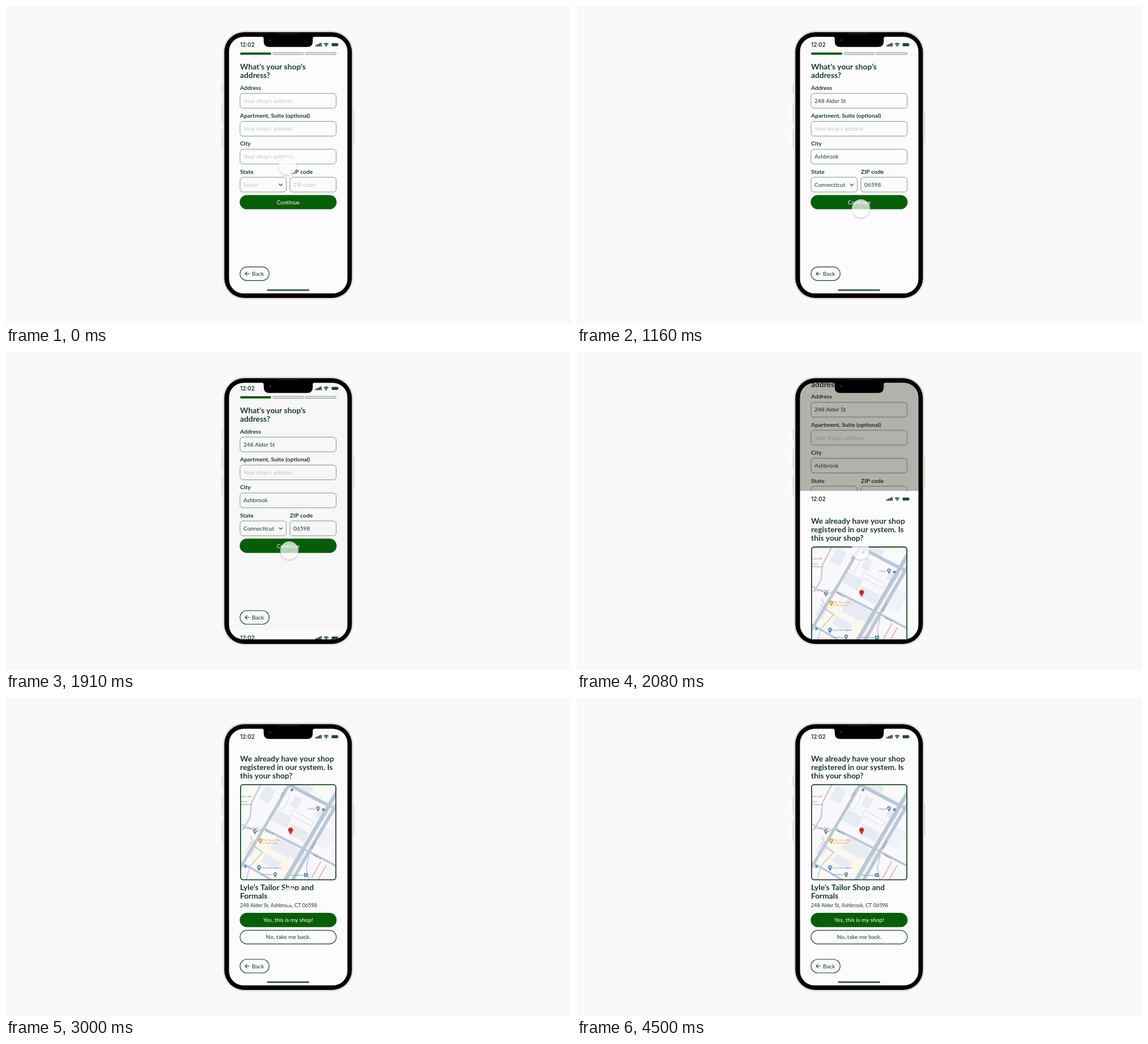
These frames come from a looping animation (997x561 px, 4.58 s). An HTML page with a canvas:

```html
<!DOCTYPE html>
<html lang="en">
<head>
<meta charset="utf-8">
<title>Shop address sign-up</title>
<style>
  html, body { margin: 0; width: 100%; height: 100%; overflow: hidden; background: #f9f9fc; }
  canvas { display: block; width: 997px; height: 561px; }
</style>
</head>
<body>
<canvas id="stage"></canvas>
<script>
const W = 997, H = 561, LOOP = 4580, FPS = 12;
const INK = '#1d3c2a', GREEN = '#075f08', PAPER = '#fcfcfe', HINT = '#c4c6cc', EDGE = '#87938f';
const SCREEN = { x: 393.5, y: 54.5, w: 209, h: 452.5, r: 26 };
const STREET = '248 Alder St', CITY = 'Ashbrook', ZIP = '06598';

const canvas = document.getElementById('stage');
const ctx = canvas.getContext('2d');
const dpr = window.devicePixelRatio || 1;
canvas.width = Math.round(W * dpr);
canvas.height = Math.round(H * dpr);

const clamp = v => Math.max(0, Math.min(1, v));
const mix = (a, b, p) => a + (b - a) * p;
const span = (t, from, to) => clamp((t - from) / (to - from));
const smooth = p => p * p * (3 - 2 * p);

// cubic-bezier(.42, 0, .58, 1)
function easeInOut(u) {
  let lo = 0, hi = 1;
  for (let i = 0; i < 24; i++) {
    const s = (lo + hi) / 2, q = 1 - s;
    const x = 1.26 * s * q * q + 1.74 * s * s * q + s * s * s;
    if (x < u) lo = s; else hi = s;
  }
  return smooth(lo);
}

function box(x, y, w, h, r, fill, stroke, line = 1) {
  ctx.beginPath();
  ctx.roundRect(x, y, w, h, r);
  if (fill) { ctx.fillStyle = fill; ctx.fill(); }
  if (stroke) { ctx.strokeStyle = stroke; ctx.lineWidth = line; ctx.stroke(); }
}

function disc(x, y, r, fill) {
  ctx.beginPath();
  ctx.arc(x, y, r, 0, 7);
  ctx.fillStyle = fill;
  ctx.fill();
}

function path(points, color, line) {
  ctx.beginPath();
  points.forEach(([x, y], i) => i ? ctx.lineTo(x, y) : ctx.moveTo(x, y));
  ctx.strokeStyle = color;
  ctx.lineWidth = line;
  ctx.stroke();
}

// cy is the middle of the capitals
function text(str, x, cy, size, { weight = 400, color = INK, align = 'left', font = 'Lato' } = {}) {
  ctx.font = `${weight} ${size}px ${font}, sans-serif`;
  ctx.textAlign = align;
  ctx.fillStyle = color;
  ctx.fillText(str, x, cy + size * 0.355);
}

const title = (str, y) => text(str, 413, y, 13.8, { weight: 700 });
const label = (str, x, y) => text(str, x, y, 10.3, { weight: 700 });

function statusBar() {
  text('12:02', 413, 68.3, 9.8, { weight: 600, font: 'Inter' });
  for (let i = 0; i < 4; i++) {
    const h = 3 + i * 1.2;
    box(546.2 + i * 2.8, 71.5 - h, 2.2, h, 0.6, INK);
  }
  for (const r of [2.9, 5.2]) {
    ctx.beginPath();
    ctx.arc(565, 71, r, -Math.PI * 0.77, -Math.PI * 0.23);
    ctx.strokeStyle = INK;
    ctx.lineWidth = 1.5;
    ctx.stroke();
  }
  disc(565, 70.5, 1.2, INK);
  box(574.6, 65.6, 11.2, 5.4, 1.2, '#1d4a28');
  box(586.3, 67.2, 0.8, 2.2, 0.4, INK);
}

function footer(y) {
  box(413, y - 12, 51.3, 24, 12, null, INK, 1.2);
  path([[430, y], [422, y]], INK, 1.1);
  path([[425.5, y - 3.5], [422, y], [425.5, y + 3.5]], INK, 1.1);
  text('Back', 434, y, 10.1);
  box(460.5, 500, 74.5, 2.5, 1.2, '#1f4c34');
}

function field(x, y, w, value, hint) {
  box(x, y, w, 26, 5, null, EDGE);
  text(value || hint, x + 6, y + 13, 10.1, { color: value ? INK : HINT });
}

function button(str, y, solid) {
  box(413, y - 12, 169.8, 24, 12, solid ? GREEN : null, solid ? GREEN : INK, 1.2);
  text(str, 498, y, 10.1, { color: solid ? '#fff' : INK, align: 'center' });
}

function formPage(filled) {
  const val = s => filled ? s : '';
  box(SCREEN.x, 54, SCREEN.w, 453, 0, PAPER);
  statusBar();
  box(413, 82, 55, 4, 2, GREEN);
  box(470.9, 82.4, 54.2, 3.2, 1.6, null, '#66756e', 0.9);
  box(527.9, 82.4, 54.6, 3.2, 1.6, null, '#66756e', 0.9);
  title('What’s your shop’s', 107);
  title('address?', 122);
  const hint = 'Your shop’s address';
  label('Address', 413, 144);
  field(413, 154.2, 169.6, val(STREET), hint);
  label('Apartment, Suite (optional)', 413, 193.5);
  field(413, 203.5, 169.6, '', hint);
  label('City', 413, 242.8);
  field(413, 252.8, 169.6, val(CITY), hint);
  label('State', 413, 292.2);
  field(413, 302.1, 81.6, val('Connecticut'), 'Select');
  path([[481.6, 313.6], [484.8, 316.8], [488, 313.6]], INK, 1.2);
  label('ZIP code', 501, 292.2);
  field(501, 302.1, 81.6, val(ZIP), 'ZIP code');
  button('Continue', 346, true);
  footer(472.3);
}

function block(x, y, w, h, fill, stroke) {
  ctx.save();
  ctx.translate(x, y);
  ctx.rotate(0.5);
  box(-w / 2, -h / 2, w, h, 1, fill, stroke, 0.8);
  ctx.restore();
}

function pin(x, y, r, color, dot) {
  ctx.beginPath();
  ctx.arc(x, y, r, Math.PI * 0.9, Math.PI * 2.1);
  ctx.quadraticCurveTo(x + r * 0.5, y + r, x, y + r * 2);
  ctx.quadraticCurveTo(x - r * 0.5, y + r, x - r * 0.95, y + r * 0.3);
  ctx.fillStyle = color;
  ctx.fill();
  disc(x, y, r * 0.38, dot);
}

function roadName(str, x, y, angle) {
  ctx.save();
  ctx.translate(x, y);
  ctx.rotate(angle);
  text(str, 0, 0, 4.2, { color: '#6b7480', align: 'center' });
  ctx.restore();
}

function map() {
  const road = '#bbc7d5', lot = '#e9ebf2', cream = '#fbf7ec', blue = '#4a83e0', grey = '#76828e';
  ctx.save();
  ctx.beginPath();
  ctx.roundRect(413.8, 152.8, 168.4, 168, 4.5);
  ctx.clip();
  ctx.fillStyle = '#f8f8fc';
  ctx.fillRect(413, 152, 170, 170);
  block(448, 272, 52, 48, cream);
  block(500, 300, 42, 28, cream);
  block(428, 180, 22, 60, '#fbfaf4');
  block(556, 164, 34, 12, '#fbfaf4');
  block(461, 171, 20, 26, lot);
  block(522, 154, 40, 14, lot);
  block(486, 213, 32, 22, lot);
  block(515, 238, 34, 18, lot);
  block(489, 263, 38, 26, lot);
  block(468, 289, 32, 16, lot);
  block(515, 277, 22, 20, lot);
  block(432, 267, 14, 22, lot);
  block(565, 248, 22, 36, '#f1f2f7');
  block(557, 204, 18, 20, lot);
  block(491, 183, 10, 27, '#f9f9fc', '#ccd3df');
  block(523, 212, 42, 9, '#f9f9fc', '#ccd3df');
  block(512, 184, 14, 20, lot);
  path([[450, 152], [433, 185], [431, 210], [417, 233]], '#c4ced9', 2.6);
  path([[413, 222], [443, 236], [452, 231]], '#c4ced9', 2.2);
  path([[432, 244], [440, 263], [453, 272], [430, 297], [424, 321]], '#c4ced9', 1.8);
  path([[430, 254], [443, 266], [454, 274]], '#c4ced9', 1.4);
  path([[413, 289], [441, 305], [470, 322]], road, 3.4);
  path([[502, 149], [456, 228], [412, 302]], road, 5);
  path([[452, 229], [500, 253], [584, 297]], road, 3.8);
  path([[494, 150], [545, 177], [584, 197]], road, 6);
  path([[585, 164], [491, 324]], road, 7);
  path([[587, 181], [504, 324]], road, 6);
  path([[586, 172], [497, 324]], '#e9edf2', 1);
  path([[535, 277], [530, 300], [535, 322]], '#c4ced9', 2);
  path([[556, 288], [539, 318]], '#f2bcc0', 2.4);
  path([[565, 295], [551, 320]], '#f2bcc0', 2.4);

  const note = (str, x, y, color = grey, align = 'left') => text(str, x, y, 4.6, { color, align });
  note('City Hall', 415, 173);
  note('Civic', 415, 182.5, blue);
  note('Financial', 415, 187.5, blue);
  note('Central Plaza', 420, 229);
  note('Depot', 546, 195.5, grey, 'right');
  note('The Tamsel Bar', 453, 250.2, '#e5943c');
  note('& Restaurant', 453, 255.2, '#e5943c');
  note('Fern Way Market', 451, 299.5, blue);
  note('215 Plaza', 470, 311.8, grey, 'right');
  note('Main Street', 525, 312.5, blue, 'right');
  roadName('Cedar St', 488, 167, -1.04);
  roadName('Alder St', 465, 237, 0.48);
  roadName('Alder St', 549, 280, 0.48);
  roadName('Birch St', 543, 259, -1.04);

  box(502.4, 160, 4.4, 4.4, 0.8, '#4b91cf');
  box(558, 194.8, 4.4, 4.4, 0.8, '#4b91cf');
  box(420.2, 295, 4.4, 4.4, 0.8, '#4b91cf');
  box(525.8, 309.2, 6.4, 6.4, 1, '#377dc0');
  box(527.7, 311, 2.6, 2.4, 0.5, '#eef5fc');
  pin(550.5, 194.2, 3.3, grey, '#fff');
  pin(439.2, 234.4, 3.3, grey, '#fff');
  pin(475, 310.6, 3.3, grey, '#fff');
  pin(448.8, 251, 3.5, '#f09a35', '#fff');
  pin(446.5, 298.6, 3.5, blue, '#fff');
  pin(502.2, 232.8, 4.4, '#df342c', '#8d1714');
  ctx.restore();
  box(413.9, 152.9, 168.2, 167.8, 4.5, null, '#24482f', 1.8);
}

function confirmPage() {
  box(SCREEN.x, 54, SCREEN.w, 453, 0, PAPER);
  statusBar();
  title('We already have your shop', 107);
  title('registered in our system. Is', 122.2);
  title('this your shop?', 137.3);
  map();
  title('Lyle’s Tailor Shop and', 334.6);
  title('Formals', 349.6);
  text(`${STREET}, ${CITY}, CT ${ZIP}`, 413, 366, 9);
  button('Yes, this is my shop!', 391.7, true);
  button('No, take me back.', 421.8, false);
  footer(473);
}

function phoneBody() {
  const metal = '#e3e0d8';
  box(380.3, 137, 4, 18, 1, metal);
  box(380.3, 171, 4, 35, 1, metal);
  box(380.3, 217, 4, 36, 1, metal);
  box(611, 184, 4, 57, 1, metal);
  box(383, 43.8, 229.6, 473.4, 37, '#d8d5cc', '#efede8', 1);
  box(385.3, 46.3, 225, 468.6, 35, '#000');
}

function notch() {
  ctx.beginPath();
  ctx.moveTo(452, 54);
  ctx.quadraticCurveTo(454.7, 54.5, 454.7, 57);
  ctx.lineTo(454.7, 62);
  ctx.quadraticCurveTo(454.7, 72.3, 465, 72.3);
  ctx.lineTo(531, 72.3);
  ctx.quadraticCurveTo(541.3, 72.3, 541.3, 62);
  ctx.lineTo(541.3, 57);
  ctx.quadraticCurveTo(541.3, 54.5, 544, 54);
  ctx.fillStyle = '#000';
  ctx.fill();
  box(478, 47.8, 40, 2, 1, '#1c1c1e');
  disc(466.3, 60.6, 2.9, '#0c0c26');
  disc(466.3, 60.6, 1.2, '#2b2b78');
}

function touch(t) {
  const alpha = 1 - span(t, 3100, 3500);
  if (!alpha) return;
  const down = smooth(span(t, 420, 1050));
  const settle = smooth(span(t, 1200, 1850));
  const x = mix(497, 501, down) - settle;
  const y = mix(282, 357, down) - 7 * settle;
  ctx.save();
  ctx.globalAlpha = alpha;
  // soft shadow kept outside the disc
  ctx.save();
  ctx.beginPath();
  ctx.rect(x - 30, y - 30, 60, 60);
  ctx.arc(x, y, 16, 0, 7);
  ctx.clip('evenodd');
  const shade = ctx.createRadialGradient(x, y + 1.5, 14, x, y + 1.5, 18.5);
  shade.addColorStop(0, `rgba(60,60,80,${mix(0.24, 0.1, span(t, 2000, 2250))})`);
  shade.addColorStop(1, 'rgba(60,60,80,0)');
  disc(x, y + 1.5, 18.5, shade);
  ctx.restore();
  disc(x, y, 16, `rgba(252,252,254,${mix(0.86, 0.73, down)})`);
  ctx.restore();
}

function draw(t) {
  ctx.setTransform(dpr, 0, 0, dpr, 0, 0);
  ctx.fillStyle = '#f9f9fc';
  ctx.fillRect(0, 0, W, H);
  phoneBody();

  const slide = easeInOut(span(t, 1862.5, 2267.5));
  ctx.save();
  ctx.beginPath();
  ctx.roundRect(SCREEN.x, SCREEN.y, SCREEN.w, SCREEN.h, SCREEN.r);
  ctx.clip();
  if (slide < 1) {
    ctx.fillStyle = PAPER;
    ctx.fillRect(SCREEN.x, SCREEN.y, SCREEN.w, SCREEN.h);
    ctx.save();
    ctx.translate(0, -slide * SCREEN.h * 0.25);
    formPage(t >= 410);
    ctx.restore();
    ctx.fillStyle = `rgba(28,26,0,${slide * 0.57})`;
    ctx.fillRect(SCREEN.x, SCREEN.y, SCREEN.w, SCREEN.h);
  }
  if (slide > 0) {
    ctx.translate(0, (1 - slide) * SCREEN.h);
    confirmPage();
  }
  ctx.restore();

  notch();
  touch(t);
}

// Motion runs at 12 steps a second, each starting on a 10 ms tick.
function step(ms) {
  const k = Math.floor(ms * FPS / 1000);
  const next = Math.floor((k + 1) * 100 / FPS) * 10;
  return (ms >= next ? k + 1 : k) * 1000 / FPS;
}

const start = performance.now();
function tick() {
  draw(step((performance.now() - start) % LOOP));
  requestAnimationFrame(tick);
}
tick();
</script>
</body>
</html>
```
